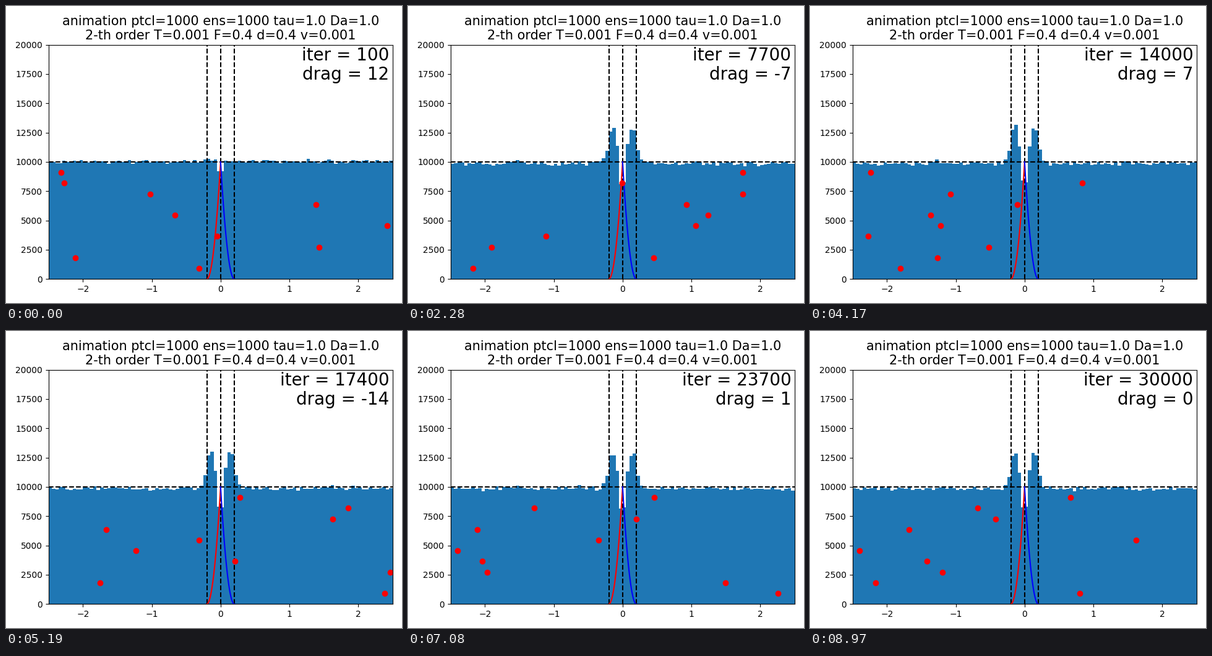
These frames come from a looping animation (640 px wide and 480 px high, 9 s). A matplotlib script:

```python
import numpy as np
import matplotlib.pyplot as plt
from matplotlib.animation import FuncAnimation

FRAMES, INTERVAL = 300, 30
BOX, BINS, LEVEL = 5.0, 100, 10000
HALF_WIDTH = 0.2
DT = 0.1
START_X = np.array([-2.32, -2.27, -1.02, 1.39, -0.66,
                    2.42, -0.05, 1.43, -2.11, -0.31])

rng = np.random.default_rng(7)


def coloured_noise(first, dt):
    """Unit-variance noise with correlation time 1, one row per frame."""
    keep = np.exp(-dt)
    rows = [np.asarray(first, float)]
    for _ in range(FRAMES - 1):
        kick = rng.normal(size=rows[0].shape)
        rows.append(keep * rows[-1] + np.sqrt(1 - keep**2) * kick)
    return np.array(rows)


def tracer_paths():
    """Active random walks in a periodic box."""
    vel = coloured_noise(rng.normal(size=START_X.size), DT)
    path = START_X + np.cumsum(vel * DT, axis=0) - vel[0] * DT
    return (path + BOX / 2) % BOX - BOX / 2


def mean_counts(step):
    """Expected histogram: particles pile up beside the central barrier."""
    excess = np.array([-1770, 1350, 2850, 2700, 930, 200], float)
    excess[0] *= 1 - np.exp(-step / 2)
    excess[1:] *= 1 - np.exp(-(step / 4) ** 2)
    half = np.full(BINS // 2, LEVEL - excess.sum() / (BINS // 2 - excess.size))
    half[:excess.size] = LEVEL + excess
    return np.concatenate([half[::-1], half])


tracers = tracer_paths()
counts = rng.poisson([mean_counts(i + 1) for i in range(FRAMES)])
drag = np.rint(8 * coloured_noise(2, 1) - 4).astype(int)

fig, ax = plt.subplots(figsize=(6.4, 4.8), dpi=100)
ax.set_title("animation ptcl=1000 ens=1000 tau=1.0 Da=1.0\n"
             "2-th order T=0.001 F=0.4 d=0.4 v=0.001", fontsize=15)
ax.set_xlim(-BOX / 2, BOX / 2)
ax.set_ylim(0, 2 * LEVEL)

edges = np.linspace(-BOX / 2, BOX / 2, BINS + 1)
hist = ax.stairs(counts[0], edges, fill=True, color="C0", lw=0)
for x in (-HALF_WIDTH, 0, HALF_WIDTH):
    ax.axvline(x, color="k", ls="--")
ax.axhline(LEVEL, color="k", ls="--")

u = np.linspace(0, 1, 50)
for side, color in ((-1, "r"), (1, "b")):
    ax.plot(side * HALF_WIDTH * u, LEVEL * (1 - u) ** 2, color=color)

heights = LEVEL * np.arange(10, 0, -1) / 11
dots, = ax.plot(tracers[0], heights, "ro")
iter_label, drag_label = (
    ax.text(0.99, y, "", transform=ax.transAxes, fontsize=20,
            ha="right", va="top") for y in (0.99, 0.91))
fig.tight_layout()


def update(i):
    hist.set_data(counts[i])
    dots.set_xdata(tracers[i])
    iter_label.set_text(f"iter = {100 * (i + 1)}")
    drag_label.set_text(f"drag = {drag[i]}")
    return hist, dots, iter_label, drag_label


anim = FuncAnimation(fig, update, frames=FRAMES, interval=INTERVAL,
                     repeat=True, repeat_delay=0)
plt.show()
```
